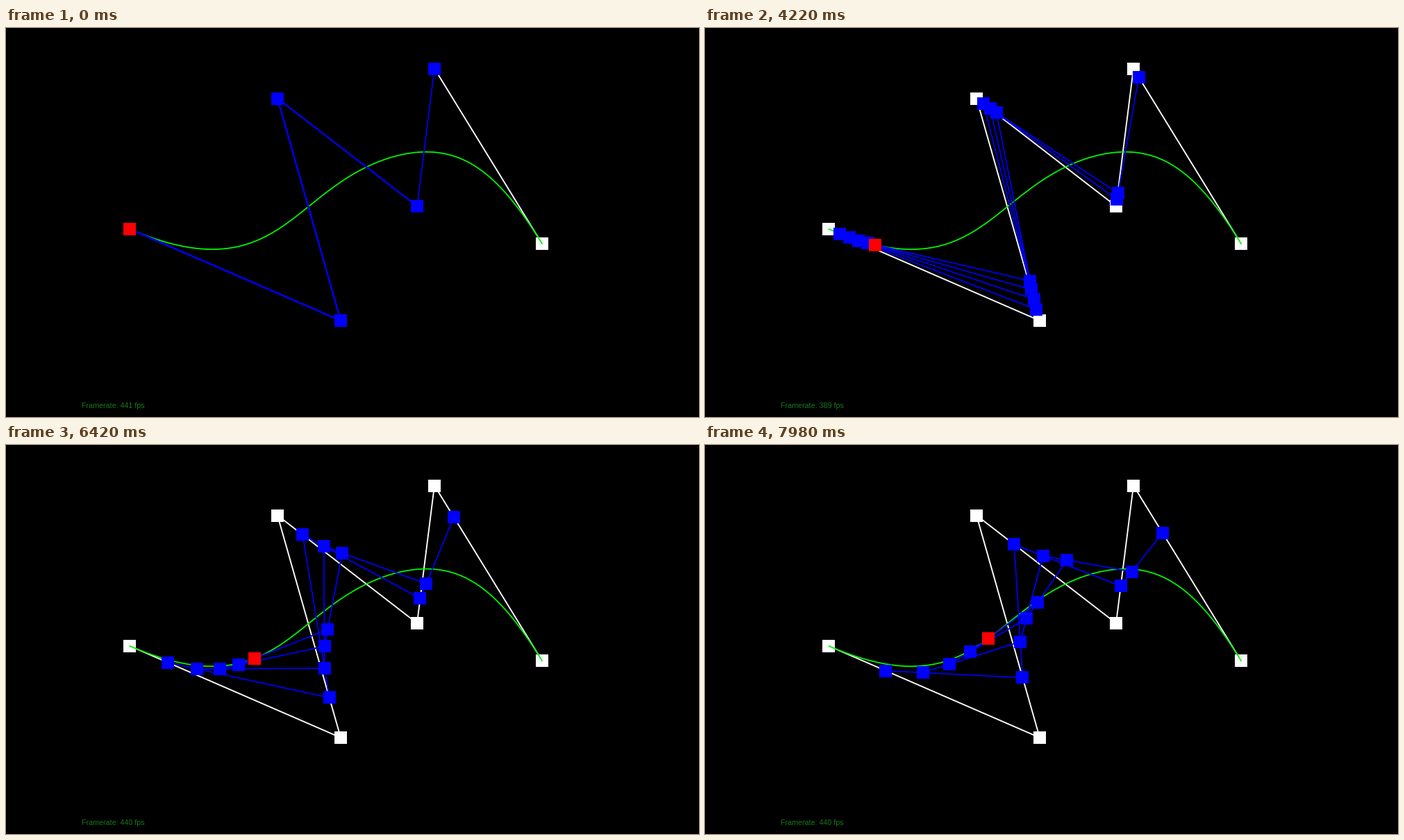
A matplotlib script for the animation above (8000 ms loop, 998 by 561 pixels).

```python
import numpy as np
import matplotlib.pyplot as plt
from matplotlib.animation import FuncAnimation

W, H, DPI = 998, 561, 64
PX = 72 / DPI          # points per pixel
STEP, LOOP = 20, 8000  # ms

CTRL = np.array([(178.5, 290), (482, 422), (391, 101.5),
                 (592, 257), (617, 58.5), (772, 311)])
GAP = np.full((1, 2), np.nan)

# curve parameter by picture count, and the counter readings
KEYS = [48, 68, 91, 119, 123, 142, 145, 160, 171]
VALS = [0, .03, .05, .12, .14, .195, .21, .235, .27]
RATES = [(0, 441), (31, 399), (82, 389), (133, 440)]


def casteljau(t):
    """All levels of repeated interpolation, down to the curve point."""
    levels = [CTRL]
    while len(levels[-1]) > 1:
        p = levels[-1]
        levels.append((1 - t) * p[:-1] + t * p[1:])
    return levels[1:]


def picture(ms):
    """Pictures come in threes, held for 20, 100 and 20 ms."""
    group, rest = divmod(ms, 140)
    return 3 * group + (rest >= 20) + (rest >= 120)


fig = plt.figure(figsize=(W / DPI, H / DPI), dpi=DPI, facecolor="black")
ax = fig.add_axes([0, 0, 1, 1])
ax.set_xlim(0, W)
ax.set_ylim(H, 0)
ax.axis("off")


def stroke(color, width, z):
    return ax.plot([], [], color=color, lw=width * PX, zorder=z,
                   solid_joinstyle="bevel")[0]


def squares(color, z):
    return ax.plot([], [], ls="", marker="s", ms=18 * PX, mew=0,
                   color=color, zorder=z)[0]


polygon = stroke("#ffffff", 1.9, 1)
corners = squares("#ffffff", 2)
curve = stroke("#00f500", 1.8, 3)
links = stroke("#0000e6", 1.9, 4)
knots = squares("#0000ff", 5)
tip = squares("#ff0000", 6)
label = ax.text(109, 548, "", color="#177a1c", family="Liberation Sans",
                fontsize=10.65 * PX, va="baseline", zorder=7)

corners.set_data(*CTRL.T)
curve.set_data(*np.array([casteljau(u)[-1][0]
                          for u in np.linspace(0, 1, 120)]).T)


def draw(n):
    i = picture(n * STEP)
    t = round(float(np.interp(i, KEYS, VALS)), 2)
    *inner, end = casteljau(t)
    # at rest the blue links hide all but the last white side
    polygon.set_data(*(CTRL if t else CTRL[4:]).T)
    links.set_data(*np.vstack([q for p in inner for q in (p, GAP)]).T)
    knots.set_data(*np.vstack(inner).T)
    tip.set_data(*end.T)
    rate = [r for start, r in RATES if i >= start][-1]
    label.set_text(f"Framerate: {rate} fps")
    return polygon, links, knots, tip, label


anim = FuncAnimation(fig, draw, frames=LOOP // STEP, interval=STEP,
                     repeat=True, repeat_delay=0)
plt.show()
```
